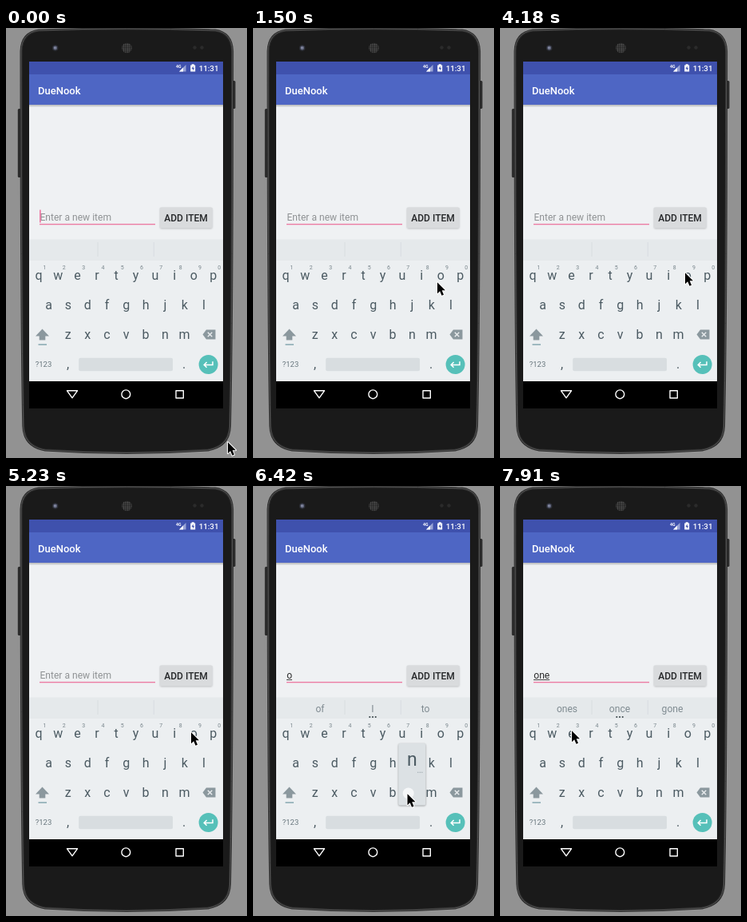
An HTML page that plays this animation: 302x538 px, repeating every 8000 ms.

```html
<!DOCTYPE html>
<html lang="en">
<head>
<meta charset="utf-8">
<title>Phone typing demo</title>
<style>
  html, body { margin: 0; width: 100%; height: 100%; overflow: hidden; background: #929292; }
  svg { display: block; width: 100%; height: 100%; }
  text { font-family: Roboto, "Open Sans", sans-serif; white-space: pre; }
</style>
</head>
<body>
<svg id="stage" viewBox="0 0 302 538">
  <defs>
    <linearGradient id="drop" x1="0" y1="0" x2="0" y2="1">
      <stop offset="0" stop-color="#000" stop-opacity=".25"/>
      <stop offset="1" stop-color="#000" stop-opacity="0"/>
    </linearGradient>
    <filter id="soft" x="-30%" y="-30%" width="160%" height="160%">
      <feGaussianBlur stdDeviation="1"/>
    </filter>
    <pattern id="mesh" width="2.4" height="2.4" patternUnits="userSpaceOnUse">
      <rect width="2.4" height="2.4" fill="#202020"/>
      <circle cx="1.2" cy="1.2" r=".75" fill="#666"/>
    </pattern>
    <path id="shell" d="M41 3C27 5 19.5 13 19 29L19.2 180Q19.8 400 21.8 498C22.3 515 32 525 49 528Q151 535 253 528C270 525 280 515 280.5 498Q282.8 400 283.4 180L283.6 29C283 13 276 5 262 3Q151 -1 41 3Z"/>
  </defs>

  <!-- phone body -->
  <rect width="302" height="538" fill="#929292"/>
  <rect x="14.8" y="101" width="4" height="86" rx="1.5" fill="#2b2b2b"/>
  <rect x="283.5" y="66" width="4" height="35" rx="1.5" fill="#2b2b2b"/>
  <use href="#shell" fill="#1a1a1a" stroke="#2a2a2a" stroke-width="3"/>
  <use href="#shell" fill="none" stroke="#555" stroke-width="1"/>
  <circle cx="61.7" cy="25" r="3.8" fill="#2c2e36"/>
  <circle cx="61.7" cy="25" r="2.4" fill="#646a80"/>
  <circle cx="61.4" cy="24.7" r="1" fill="#9499b2"/>
  <circle cx="151.5" cy="25" r="6.3" fill="url(#mesh)"/>
  <circle cx="236.5" cy="24.5" r="2.2" fill="#2b2b2b"/>
  <circle cx="245.5" cy="24.5" r="2.2" fill="#2b2b2b"/>

  <!-- app -->
  <rect x="29" y="42" width="243" height="434" fill="#eff1f3"/>
  <rect x="29" y="42" width="243" height="16" fill="#3f51ad"/>
  <rect x="29" y="58" width="243" height="38" fill="#4e66c4"/>
  <rect x="29" y="96" width="243" height="3.5" fill="url(#drop)"/>
  <text x="40" y="82.5" font-size="13" font-weight="500" fill="#fff">DueNook</text>
  <text x="266.5" y="54" font-size="9.8" font-weight="500" fill="#fff" text-anchor="end">11:31</text>
  <text x="213" y="50" font-size="5.2" font-weight="700" fill="#fff">4G</text>
  <path d="M225.5 46V54.5H217Z" fill="#9aa5d6"/>
  <path d="M222 49.5V54.5H217Z" fill="#fff"/>
  <path d="M231.2 46.5H232.7V45.3H235.7V46.5H237.2V54.6H231.2Z" fill="#fff"/>
  <path d="M234.7 47.6L232.6 51H234V53.5L236 50.1H234.7Z" fill="#3f51ad"/>

  <!-- input row -->
  <rect x="42" y="244.9" width="145" height="1.4" fill="#ec7ba3"/>
  <text id="hint" x="42.4" y="241" font-size="12.1" fill="#8f9294">Enter a new item</text>
  <text id="typed" x="42.3" y="241" font-size="12.1" fill="#2a2a2a"></text>
  <rect id="under" x="42" y="242" height="1" fill="#444"/>
  <rect id="caret" y="227.5" width="1.4" height="16" fill="#ee6294"/>
  <rect x="193" y="225.3" width="65.5" height="26" rx="2" fill="#000" opacity=".2" filter="url(#soft)"/>
  <rect x="192.5" y="224.5" width="66.3" height="25.7" rx="1.5" fill="#d9dbdd"/>
  <text x="225.5" y="241.5" font-size="12" font-weight="500" fill="#242628" text-anchor="middle">ADD ITEM</text>

  <!-- keyboard -->
  <rect x="29" y="264.5" width="243" height="27" fill="#e5e9eb"/>
  <rect x="29" y="291" width="243" height="151" fill="#eceff1"/>
  <path d="M115 268V286M185.3 268V286" stroke="#d8dde0" stroke-width="1"/>
  <g id="words" font-size="12.1" fill="#7f8b91" text-anchor="middle"></g>
  <g id="dots" fill="#3d484d">
    <circle cx="146.3" cy="289" r="1.1"/><circle cx="150" cy="289" r="1.1"/><circle cx="153.7" cy="289" r="1.1"/>
  </g>
  <g id="keys" fill="#4b5a62" text-anchor="middle"></g>
  <path d="M45.5 376.5L54 385.5H49.3V390.5H41.7V385.5H37Z" fill="#8b989e"/>
  <rect x="40.5" y="395.4" width="10.5" height="1.4" fill="#7fa3ac"/>
  <path d="M251 377.5H262.5V389.5H251L246.5 383.5Z" fill="#8b989e"/>
  <path d="M252.8 380.8L258.3 386.3M258.3 380.8L252.8 386.3" stroke="#eceff1" stroke-width="1.3"/>
  <rect x="91.2" y="412.7" width="117.8" height="16.6" rx="2" fill="#d8dde0"/>
  <circle cx="253.6" cy="421" r="12" fill="#56c0b9"/>
  <path d="M259 417.3V421.4H248.5M251.6 418L248.2 421.4L251.6 424.8" fill="none" stroke="#fff" stroke-width="1.5"/>

  <!-- navigation bar -->
  <rect x="29" y="442" width="243" height="34" fill="#000"/>
  <g fill="none" stroke="#fff" stroke-width="1.4" stroke-linejoin="round">
    <path d="M76.5 453.8H89.5L83 462.8Z"/>
    <circle cx="150.3" cy="458.3" r="5.4"/>
    <rect x="213" y="453.7" width="9.3" height="9.3"/>
  </g>

  <!-- pressed key, centred on its key -->
  <g id="popup">
    <rect x="-17" y="-61.3" width="34" height="77.5" rx="2" fill="#000" opacity=".36" filter="url(#soft)"/>
    <rect x="-17" y="-62" width="34" height="77.5" rx="2" fill="#dce1e4"/>
    <text id="big" y="-34.4" font-size="23" fill="#4b5a62" text-anchor="middle"></text>
    <text x="10" y="-25.5" font-size="12" fill="#9aa5ab" text-anchor="middle">…</text>
  </g>

  <g id="mouse">
    <circle id="touch" cx="1.2" cy="-.5" r="7" fill="#fff" opacity=".72"/>
    <path d="M0 .3V14.2L3.2 11.2L5.5 16.8L8 15.8L5.7 10.3H10Z" fill="#000" stroke="#fff" stroke-width="2" stroke-linejoin="round" paint-order="stroke"/>
  </g>
</svg>

<script>
const LOOP = 8000;
const $ = id => document.getElementById(id);

function addText(parent, x, y, text, attrs = {}) {
  const node = document.createElementNS("http://www.w3.org/2000/svg", "text");
  for (const [k, v] of Object.entries({ x, y, ...attrs })) node.setAttribute(k, v);
  node.textContent = text;
  parent.append(node);
  return node;
}

// Keyboard letters; each row is [letters, first centre, centre line].
const keyAt = {};
const rows = [["qwertyuiop", 41, 310], ["asdfghjkl", 53.6, 347], ["zxcvbnm", 77.8, 384]];
for (const [letters, x0, y] of rows) {
  [...letters].forEach((letter, i) => {
    const x = x0 + 24.3 * i;
    keyAt[letter] = [x, y];
    addText($("keys"), x, y + 5, letter, { "font-size": 16 });
  });
}
for (let i = 0; i < 10; i++) {
  addText($("keys"), 48.5 + 24.3 * i, 301.5, (i + 1) % 10, { "font-size": 7, fill: "#78858b" });
}
addText($("keys"), 47, 424, "?123", { "font-size": 9.5, fill: "#68767d" });
addText($("keys"), 77.5, 426, ",", { "font-size": 16 });
addText($("keys"), 223, 426, ".", { "font-size": 16 });

const words = [84, 150, 216].map(x => addText($("words"), x, 283, ""));

// Stepped tracks: each entry holds from its start time until the next one.
const pointer = [
  [0, 278, 518], [450, 275, 472], [600, 271, 398], [750, 269, 353],
  [1050, 260, 338], [1200, 246, 325], [1350, 234, 319], [1500, 231, 318],
  [2540, 212, 350], [2690, 185, 391], [2840, 184, 398], [2990, 185, 399],
  [3130, 190, 392], [3280, 205, 371], [3430, 223, 339], [3580, 233, 316],
  [3730, 232, 306], [5080, 232, 307], [5230, 232, 308],
  [5970, 224, 330], [6120, 205, 368], [6270, 194, 384], [6420, 193.5, 385],
  [6710, 160, 330], [6860, 125, 317], [7010, 101, 309], [7160, 91, 307], [7310, 90, 306]
];
const entry = [
  [0, "", []],
  [5820, "o", ["of", "I", "to"]],
  [6570, "on", ["one", "on", "only"]],
  [7460, "one", ["ones", "once", "gone"]]
];
const press = [[0, ""], [5670, "o"], [5820, ""], [6420, "n"], [6570, ""], [7310, "e"], [7460, ""]];
const caretFlips = [150, 750, 1200, 1640, 2240, 2690, 3280, 3730, 4180, 4780, 5230, 5820, 6420, 6570, 7160, 7460, 7910];
const caretX = [42.2, 49, 55.6, 62.2];

const at = (track, t) => track.findLast(step => step[0] <= t);
const show = (id, on) => $(id).setAttribute("visibility", on ? "visible" : "hidden");
const move = (id, x, y) => $(id).setAttribute("transform", `translate(${x} ${y})`);

function draw(t) {
  const [, x, y] = at(pointer, t);
  const [, text, guesses] = at(entry, t);
  const [, key] = at(press, t);

  move("mouse", x, y);
  show("touch", key);
  show("popup", key);
  if (key) {
    move("popup", ...keyAt[key]);
    $("big").textContent = key;
  }

  $("typed").textContent = text;
  show("hint", !text);
  $("under").setAttribute("width", caretX[text.length] - 42);
  show("under", text);
  $("caret").setAttribute("x", caretX[text.length]);
  show("caret", caretFlips.filter(flip => flip <= t).length % 2 === 0);

  words.forEach((word, i) => word.textContent = guesses[i] || "");
  show("dots", text);
}

const start = performance.now();
function tick() {
  draw((performance.now() - start) % LOOP);
  requestAnimationFrame(tick);
}
tick();
</script>
</body>
</html>
```
